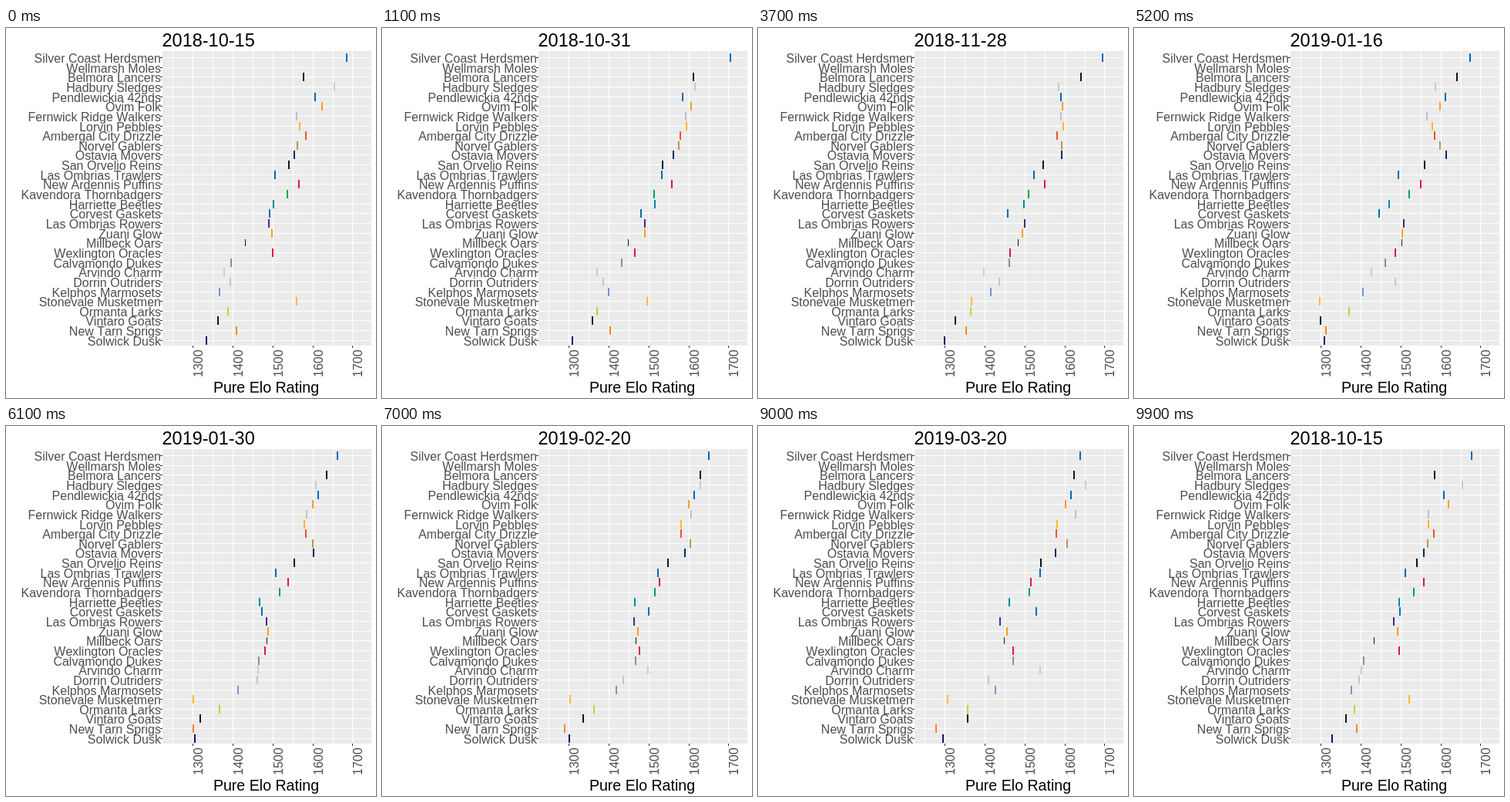
These frames come from a looping animation (480x480 px, 10000 ms). An HTML page:

```html
<!DOCTYPE html>
<html lang="en">
<head>
<meta charset="utf-8">
<title>Ratings by week</title>
<style>
  html, body { margin: 0; width: 100%; height: 100%; overflow: hidden; background: #fff; }
  svg { display: block; width: 480px; height: 480px; font-family: "Liberation Sans", Arial, sans-serif; font-kerning: none; }
  rect { shape-rendering: crispEdges; }
</style>
</head>
<body>
<svg id="chart" viewBox="0 0 480 480"></svg>
<script>
const chart = document.getElementById('chart');
const FRAMES = 100, FRAME_MS = 100, STATES = 15;
const DAY = 864e5, FIRST_DAY = Date.UTC(2018, 9, 15);
const LAST_STATE = FRAMES * (STATES - 1) / STATES;
const knots = [0, 20, 52, 80, LAST_STATE, FRAMES];
const teams = [];

function el(name, attrs, text = '') {
  const node = document.createElementNS('http://www.w3.org/2000/svg', name);
  for (const key in attrs) node.setAttribute(key, attrs[key]);
  node.textContent = text;
  return chart.appendChild(node);
}
const rect = (x, y, width, height, fill) => el('rect', { x, y, width, height, fill });
const label = (text, size, fill, attrs) => el('text', { 'font-size': size, fill, ...attrs }, text);
const rowY = i => Math.round(38 + 12.646 * i);

// Piecewise linear value at t
function along(stops, values, t) {
  const k = Math.max(1, stops.findIndex(s => s >= t));
  const u = (t - stops[k - 1]) / (stops[k] - stops[k - 1]);
  return values[k - 1] + (values[k] - values[k - 1]) * u;
}

// Ratings start at a, pass b and c, settle at d, then return to a.
function team(name, color, [a, b, c, d], w = 2, h = 11) {
  teams.push({ name, color, path: [a, b, c, d, d, a], w, h });
}

team('Silver Coast Herdsmen', '#006bb6', [442, 460, 436, 418]);
team('Wellmarsh Moles', '#f0ebd2', [354, 397, 435, 440], 1, 5);
team('Belmora Lancers', '#061922', [386, 419, 419, 410]);
team('Hadbury Sledges', '#c8cbcb', [426, 389, 391, 425]);
team('Pendlewickia 42nds', '#006bb6', [401, 381, 404, 406]);
team('Ovim Folk', '#f9a01b', [410, 393, 397, 399]);
team('Fernwick Ridge Walkers', '#bac3c9', [377, 407, 380, 412]);
team('Lorvin Pebbles', '#fdb927', [381, 406, 387, 388]);
team('Ambergal City Drizzle', '#f05133', [389, 386, 390, 387]);
team('Norvel Gablers', '#bb9753', [378, 390, 397, 401]);
team('Ostavia Movers', '#002d62', [374, 382, 405, 386]);
team('San Orvelio Reins', '#061922', [367, 361, 377, 367]);
team('Las Ombrias Trawlers', '#006bb6', [349, 375, 343, 366]);
team('New Ardennis Puffins', '#d81c3f', [380, 373, 372, 354]);
team('Kavendora Thornbadgers', '#00a550', [365, 344, 357, 352]);
team('Harriette Beetles', '#008ca8', [347, 360, 331, 326]);
team('Corvest Gaskets', '#006bb6', [342, 331, 318, 361]);
team('Las Ombrias Rowers', '#552582', [341, 341, 350, 314]);
team('Zuani Glow', '#f9a01b', [345, 338, 348, 323]);
team('Millbeck Oars', '#061922', [310, 327, 347, 319], 1, 9);
team('Wexlington Oracles', '#e31837', [346, 313, 339, 331]);
team('Calvamondo Dukes', '#8e9090', [292, 326, 326, 331]);
team('Arvindo Charm', '#c4ced3', [283, 275, 308, 366]);
team('Dorrin Outriders', '#c0c9cc', [291, 283, 339, 299]);
team('Kelphos Marmosets', '#7399c6', [277, 307, 297, 308]);
team('Stonevale Musketmen', '#fdbb30', [377, 317, 241, 246]);
team('Ormanta Larks', '#c1d32f', [288, 272, 279, 272]);
team('Vintaro Goats', '#061922', [275, 272, 242, 272]);
team('New Tarn Sprigs', '#f58426', [299, 293, 249, 231]);
team('Solwick Dusk', '#1d1160', [260, 237, 247, 240]);

// Panel, grid and axes
rect(203, 30, 271, 382, '#ebebeb');
for (let i = 0; i < 10; i++) {
  const x = Math.round(216 + 25.94 * i);
  rect(x, 30, 1, 382, '#fff');
  if (i % 2) {
    rect(x, 412, 1, 3, '#333');
    label(1250 + 50 * i, 16, '#4d4d4d', { transform: `translate(${x + 13} 453) rotate(-90)` });
  }
}
teams.forEach((t, i) => {
  const y = rowY(i);
  rect(203, y, 271, 1, '#fff');
  rect(200, y, 3, 1, '#333');
  label(t.name, 16, '#4d4d4d', { x: 201, y: y + 7, 'text-anchor': 'end' });
});
label('Pure Elo Rating', 19.6, '#000', { x: 337.5, y: 473, 'text-anchor': 'middle' });
const title = label('', 23.5, '#000', { x: 202.5, y: 24 });

teams.forEach((t, i) => {
  t.bar = rect(0, rowY(i) - (t.h - 1) / 2, t.w, t.h, t.color);
});

// Weekly at first, with wider gaps over midwinter
function dateOf(state) {
  const week = Math.round(along([0, 6, 8, 12, 14], [0, 6, 13, 20, 22], state));
  const days = week && week * 7 + 2;
  return new Date(FIRST_DAY + days * DAY).toISOString().slice(0, 10);
}

function draw(now) {
  const frame = Math.floor(now / FRAME_MS) % FRAMES;
  for (const t of teams) {
    t.bar.setAttribute('x', Math.round(along(knots, t.path, frame) - t.w / 2));
  }
  title.textContent = dateOf(Math.round(frame * STATES / FRAMES) % STATES);
}

const start = performance.now();
function loop() {
  draw(performance.now() - start);
  requestAnimationFrame(loop);
}
loop();
</script>
</body>
</html>
```
